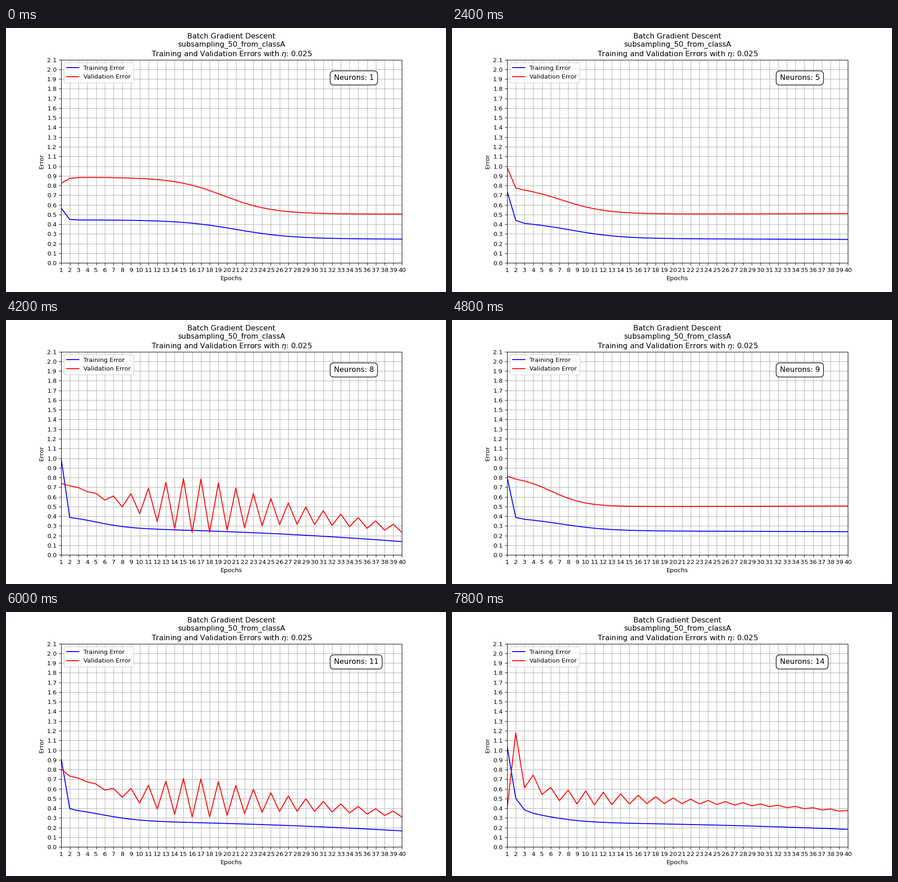
Animation, 966 px wide and 580 px high, one loop 8 s. Source, as a matplotlib script:

```python
import numpy as np
import matplotlib.pyplot as plt
from matplotlib.animation import FuncAnimation

DPI = 96.6
STEP_MS = 200
FRAMES = 40
FRAMES_PER_RUN = 3
EPOCHS = np.arange(1, 41)


def params(start, hi, lo, mid, width, late=0.0, decay=0.04,
           ripple=0.0, peak=16.3, spread=0.32):
    return np.array([start, hi, lo, mid, width, late, decay, ripple, peak, spread])


def error(p):
    """Sigmoid drop from hi to lo, a late decline, a first kick and a ripple."""
    start, hi, lo, mid, width, late, decay, ripple, peak, spread = p
    drop = lo + (hi - lo) / (1 + np.exp((EPOCHS - mid) / width))
    base = drop - late * ((EPOCHS - 1) / 39) ** 2
    kick = (start - base[0]) * decay ** (EPOCHS - 1.0)
    swing = ripple / np.cosh(np.log(EPOCHS / peak) / spread)
    return base + kick + swing * (-1.0) ** EPOCHS


def mix(a, b, weight):
    return [p + weight * (q - p) for p, q in zip(runs[a], runs[b])]


# neurons -> parameters of the training and the validation curve
runs = {
    1: (params(0.569, 0.445, 0.252, 21, 3.2, 0.006),
        params(0.823, 0.885, 0.505, 19.6, 2.8, decay=0.18)),
    3: (params(0.605, 0.432, 0.251, 8.3, 2.9, 0.008),
        params(0.963, 0.845, 0.505, 7.2, 2.4, -0.005, decay=0.16)),
    5: (params(0.745, 0.433, 0.251, 8.2, 2.9, 0.008, decay=0.08),
        params(0.990, 0.800, 0.504, 7.2, 2.55, -0.006)),
    7: (params(0.725, 0.395, 0.249, 7.1, 2.8, 0.012, decay=0.07),
        params(0.966, 0.810, 0.501, 5.85, 2.05)),
    9: (params(0.810, 0.395, 0.248, 7.1, 2.75, 0.008, decay=0.03),
        params(0.816, 0.815, 0.500, 6.1, 1.9, -0.006)),
    11: (params(0.925, 0.410, 0.266, 5.5, 2.25, 0.1, decay=0.02),
         params(0.805, 0.760, 0.540, 4.8, 1.5, 0.207, ripple=-0.2)),
    14: (params(1.050, 0.402, 0.252, 5, 2.4, 0.07, decay=0.2),
         params(0.385, 1.510, 0.510, 1.1, 1.7, 0.14, decay=-0.46,
                ripple=0.07, peak=10, spread=0.45)),
}
runs[2] = mix(1, 3, 0.5)
runs[4] = mix(3, 11, 0.7)
runs[6] = mix(5, 7, 0.5)
runs[8] = mix(7, 11, 1.4)
runs[10] = mix(9, 11, 0.7)
runs[12] = mix(11, 14, 1 / 3)
runs[13] = mix(11, 14, 2 / 3)

# the tiny excess keeps the pixel size from rounding down
fig, ax = plt.subplots(figsize=((966 + 1e-6) / DPI, (580 + 1e-6) / DPI), dpi=DPI)
train_line, = ax.plot(EPOCHS, error(runs[1][0]), color="blue", label="Training Error")
valid_line, = ax.plot(EPOCHS, error(runs[1][1]), color="red", label="Validation Error")
ax.set_title("Batch Gradient Descent\nsubsampling_50_from_classA\n"
             r"Training and Validation Errors with $\eta$: 0.025")
ax.set_xlabel("Epochs")
ax.set_ylabel("Error")
ax.set_xlim(1, 40)
ax.set_ylim(0, 2.1)
ax.set_xticks(EPOCHS)
ax.set_yticks(np.arange(22) / 10)
ax.grid(True)
ax.legend(loc="upper left")
label = ax.text(0.8, 0.9, "Neurons: 1", transform=ax.transAxes, fontsize=12,
                bbox=dict(boxstyle="round,pad=0.5", facecolor="white", edgecolor="black"))


def update(frame):
    neurons = frame // FRAMES_PER_RUN + 1
    train, valid = runs[neurons]
    train_line.set_ydata(error(train))
    valid_line.set_ydata(error(valid))
    label.set_text(f"Neurons: {neurons}")
    return train_line, valid_line, label


anim = FuncAnimation(fig, update, frames=FRAMES, interval=STEP_MS, repeat=True)
plt.show()
```
